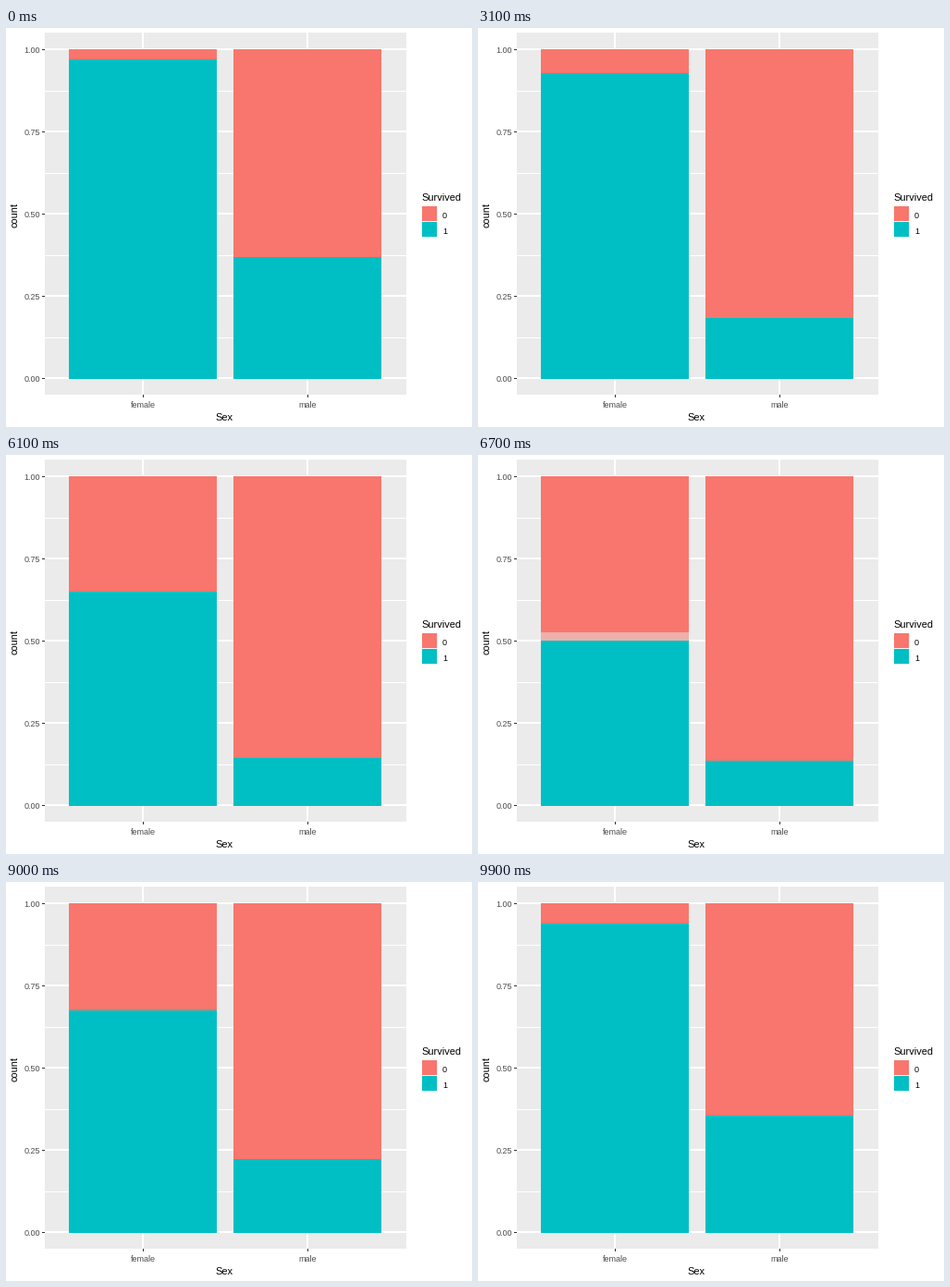
Animation of 504x432 px, one loop 10 s. Source, as a matplotlib script:

```python
import matplotlib.pyplot as plt
from matplotlib.animation import FuncAnimation
from matplotlib.patches import Rectangle

W, H, DPI = 504, 432, 72
RED, TEAL, PALE = "#F8766D", "#00BFC4", "#EEB0AA"
PANEL, INK, TICK, LABEL = "#EBEBEB", "#000000", "#333333", "#4D4D4D"

TOP, BASE, SPAN = 23, 380, 356.3
BAR_X = (68, 246)
BAR_W = 160

# Survival share (female, male) for each passenger class
RATES = [(91 / 94, 45 / 122), (70 / 76, 17 / 108), (72 / 144, 47 / 347)]
# Last still frame of each class and the number of steps to the next one
MOVES = [(16, 17), (50, 17), (84, 16)]
FRAMES, INTERVAL = 100, 100

plt.rcParams["font.family"] = "Liberation Sans"
fig = plt.figure(figsize=(W / DPI, H / DPI), dpi=DPI, facecolor="white")
ax = fig.add_axes([0, 0, 1, 1])
ax.set_xlim(0, W)
ax.set_ylim(H, 0)
ax.axis("off")


def box(x0, y0, x1, y1, color, z=1):
    patch = Rectangle((x0, y0), x1 - x0, y1 - y0, facecolor=color,
                      edgecolor="none", linewidth=0, antialiased=False, zorder=z)
    return ax.add_patch(patch)


def label(x, y, text, size, color=INK, ha="left", **kw):
    ax.text(x, y, text, fontsize=size, color=color, ha=ha,
            va=kw.pop("va", "baseline"), zorder=5, **kw)


def edge(p):
    return round(TOP + (1 - p) * SPAN)


def shares(i):
    for k, (start, steps) in enumerate(MOVES):
        if i <= start:
            return RATES[k]
        if i < start + steps:
            t = (i - start) / steps
            a, b = RATES[k], RATES[(k + 1) % len(RATES)]
            return [u + (v - u) * t for u, v in zip(a, b)]
    return RATES[0]


# Panel, grid and axes
box(42, 5, 433, 397, PANEL)
for k in range(4):
    y = round(TOP + (k + 0.5) * SPAN / 4)
    box(42, y, 433, y + 1, "white")
for k in range(5):
    y = round(TOP + k * SPAN / 4)
    box(42, y - 1, 433, y + 1, "white")
    box(39, y, 42, y + 1, TICK)
    label(37.3, y + 4, f"{1 - k / 4:.2f}", 9, LABEL, "right")
for x, name in ((148, "female"), (326, "male")):
    box(x - 1, 5, x + 1, 397, "white")
    box(x, 397, x + 1, 400, TICK)
    label(x, 411, name, 9, LABEL, "center")
label(236.3, 425, "Sex", 11, ha="center")
label(15, 202, "count", 11, ha="right", va="center", rotation=90)

# Legend
label(449.5, 187, "Survived", 11)
box(450, 193, 467, 227, "#F2F2F2")
for y, color, name in ((193, RED, "0"), (210, TEAL, "1")):
    box(450, y, 466, y + 16, color, 2)
    label(472, y + 13, name, 9)

for x in BAR_X:
    box(x, TOP, x + BAR_W, BASE, RED, 2)
bars = [box(x, TOP, x + BAR_W, BASE, TEAL, 3) for x in BAR_X]
strip = box(BAR_X[0], 192, BAR_X[0] + BAR_W, 201, PALE, 3)


def draw(i):
    for bar, p in zip(bars, shares(i)):
        y = edge(p)
        bar.set_y(y)
        bar.set_height(BASE - y)
    strip.set_visible(67 <= i <= 84)
    return bars + [strip]


anim = FuncAnimation(fig, draw, frames=FRAMES, interval=INTERVAL,
                     init_func=lambda: draw(0), repeat=True, repeat_delay=0)
plt.show()
```
